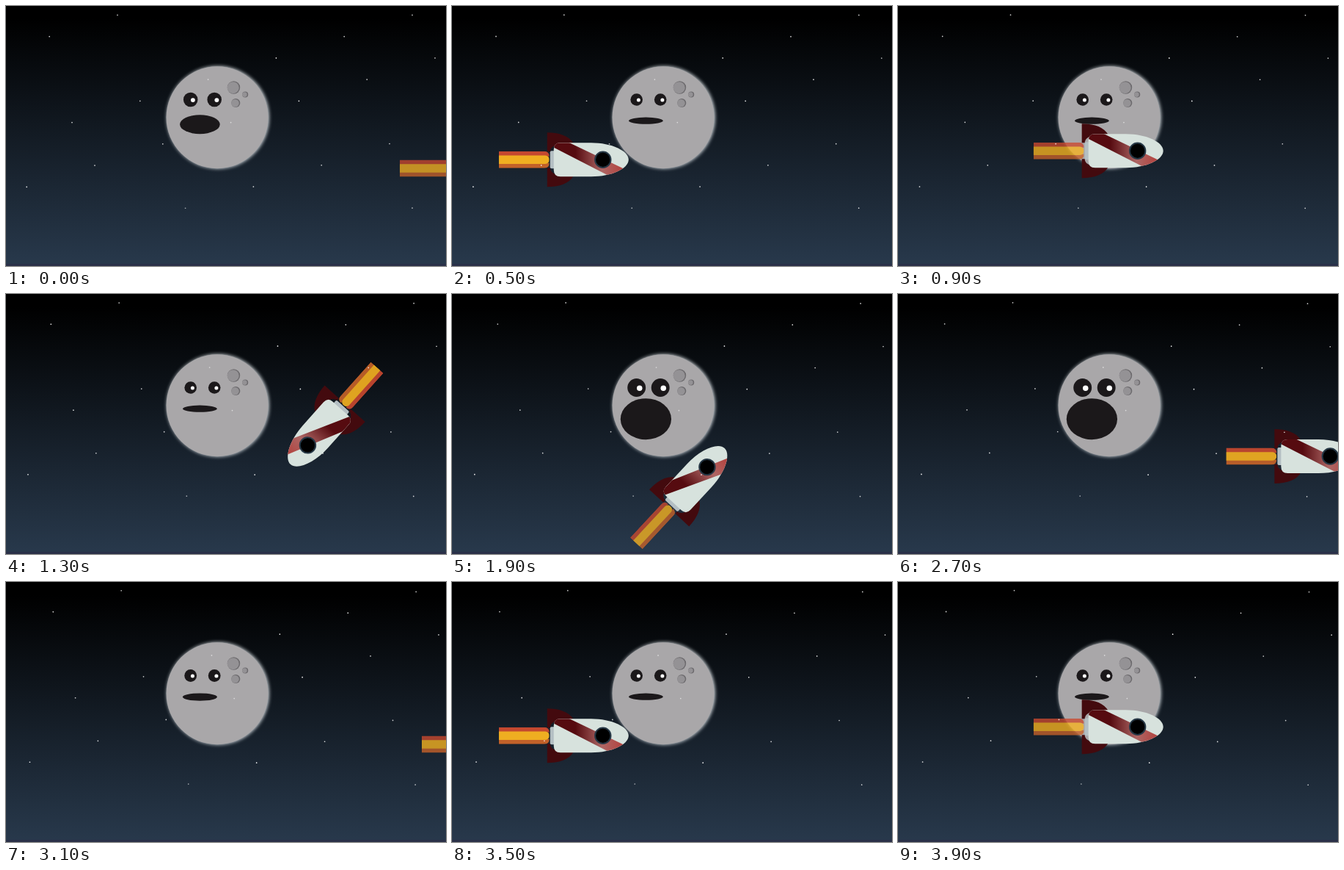
Recreate the animation shown at these times as an HTML page. Size 600x354 px, loop 4 s.

```html
<!DOCTYPE html>
<html lang="en">
<head>
<meta charset="utf-8">
<title>Moon and rocket</title>
<style>
  html, body { margin: 0; width: 100%; height: 100%; overflow: hidden; background: #000; }
  svg { display: block; width: 600px; height: 354px; }
  .moon { filter: drop-shadow(1px 0 2.5px #dfe6ea); }
</style>
</head>
<body>
<svg viewBox="0 0 600 354">
  <defs>
    <linearGradient id="sky" x2="0" y2="1">
      <stop offset=".05" stop-color="#000"/>
      <stop offset="1" stop-color="#28394c"/>
    </linearGradient>
    <linearGradient id="band" gradientUnits="userSpaceOnUse" x1="-50" x2="45">
      <stop offset=".3" stop-color="#560b10"/>
      <stop offset=".68" stop-color="#ad6664"/>
      <stop offset="1" stop-color="#b4403c"/>
    </linearGradient>
    <path id="hull" d="M-51-14Q-51-23-42-23H0C28-23 51-12 51 0S28 23 0 23H-42Q-51 23-51 14Z"/>
    <clipPath id="inHull"><use href="#hull"/></clipPath>
    <clipPath id="inFlame"><path d="M-126-11.5H-64Q-57-11.5-57-4V4Q-57 11.5-64 11.5H-126Z"/></clipPath>
    <path id="fin" d="M-60-37C-45-37-30-33-24-22L-48-20Q-56-17-56-11H-60Z"/>
  </defs>

  <rect width="600" height="354" fill="url(#sky)"/>
  <rect y="351" width="600" height="3" fill="#2a3048"/>

  <circle class="moon" cx="288" cy="151.7" r="69.5" fill="#a9a7a9"/>
  <g id="craters"></g>
  <g id="eyes"></g>
  <ellipse id="mouth" cx="264.4" fill="#1b181a"/>

  <g id="rocket">
    <g id="flame" clip-path="url(#inFlame)">
      <rect x="-126" y="-11.5" width="70" height="7" fill="#cb4a30"/>
      <rect x="-126" y="4.5" width="70" height="7" fill="#c9642a"/>
      <rect x="-136" y="-5.7" width="79" height="11.4" rx="5.5" fill="#f7b322"/>
    </g>
    <g fill="#430a0e">
      <use href="#fin"/>
      <use href="#fin" transform="scale(1 -1)"/>
    </g>
    <rect x="-56" y="-12" width="9" height="24" rx="2" fill="#b4bfc3"/>
    <use href="#hull" fill="#d7e2dd"/>
    <path clip-path="url(#inHull)" fill="url(#band)" d="M-52-26H-36L52 16 34 27-52-17Z"/>
    <circle cx="16" r="10.7" stroke="#263745" stroke-width="2"/>
  </g>

  <g id="stars" fill="#fff"></g>
</svg>
<script>
const LOOP = 4000, CYCLE = 3000, START = 107;
const $ = id => document.getElementById(id);
const lerp = (a, b, k) => a + (b - a) * k;

function add(parent, tag, attrs) {
  const el = document.createElementNS('http://www.w3.org/2000/svg', tag);
  for (const name in attrs) el.setAttribute(name, attrs[name]);
  return parent.appendChild(el);
}

// Linear interpolation between [phase, ...values] keys.
function at(keys, p) {
  const i = Math.max(1, keys.findIndex(key => key[0] >= p));
  const a = keys[i - 1], b = keys[i], k = (p - a[0]) / (b[0] - a[0]);
  return a.slice(1).map((v, j) => lerp(v, b[j + 1], k));
}

// phase, x, y, heading
const flight = [
  [0, 71, 221, 0], [.3, 343, 194, 0], [.4, 424, 194, 135],
  [.6, 336, 248, 315], [.7, 426, 221, 360], [1, 695, 221, 360]
];
// phase, amount of surprise
const mood = [[0, 0], [.4, 0], [.5, 1], [.9, 1], [1, 0]];

for (const [cx, cy, r] of [[310.5, 111, 8.7], [326.2, 120.4, 4], [313.3, 132, 6]]) {
  add($('craters'), 'circle', { cx, cy, r, fill: '#6b696c' });
  add($('craters'), 'circle', { cx: cx - .8, cy: cy + .2, r: r - .7, fill: '#949295' });
}

const eyes = [251.7, 284.2].map(x => {
  const eye = add($('eyes'), 'g', {});
  add(eye, 'circle', { r: 8.3, fill: '#1b181a' });
  add(eye, 'circle', { cx: 2.7, cy: .5, r: 2.5, fill: '#fff' });
  return { eye, x };
});

// Diagonal chains of stars: x, y, count
for (const [x, y, count] of [[152, 12.3, 2], [554, 12.3, 6], [585, 70.8, 7], [523, 187.5, 4], [554, 275, 1]])
  for (let i = 0; i < count; i++)
    add($('stars'), 'circle', {
      cx: x - 92.8 * i, cy: y + 29.25 * i, r: .85, opacity: [.8, .85, .95, .6][i % 4]
    });

function draw(now) {
  const t = now % LOOP;
  const phase = (t - START + CYCLE) % CYCLE / CYCLE;
  const [x, y, heading] = at(flight, phase);
  const [wow] = at(mood, phase);

  $('rocket').setAttribute('transform', `translate(${x} ${y}) rotate(${heading})`);
  $('flame').setAttribute('opacity', .87 - .1 * Math.cos(t * Math.PI / 500));
  $('stars').setAttribute('transform', `rotate(${t * 7.2e-5} 300 1340)`);

  for (const { eye, x } of eyes)
    eye.setAttribute('transform', `translate(${x} 127.5) scale(${lerp(1, 1.5, wow)})`);
  $('mouth').setAttribute('cy', lerp(156.2, 170.2, wow));
  $('mouth').setAttribute('rx', lerp(23.2, 34.6, wow));
  $('mouth').setAttribute('ry', lerp(4.6, 28, wow));
}

let begin;
function tick(now) {
  begin ??= now;
  draw(now - begin);
  requestAnimationFrame(tick);
}
draw(0);
requestAnimationFrame(tick);
</script>
</body>
</html>
```
